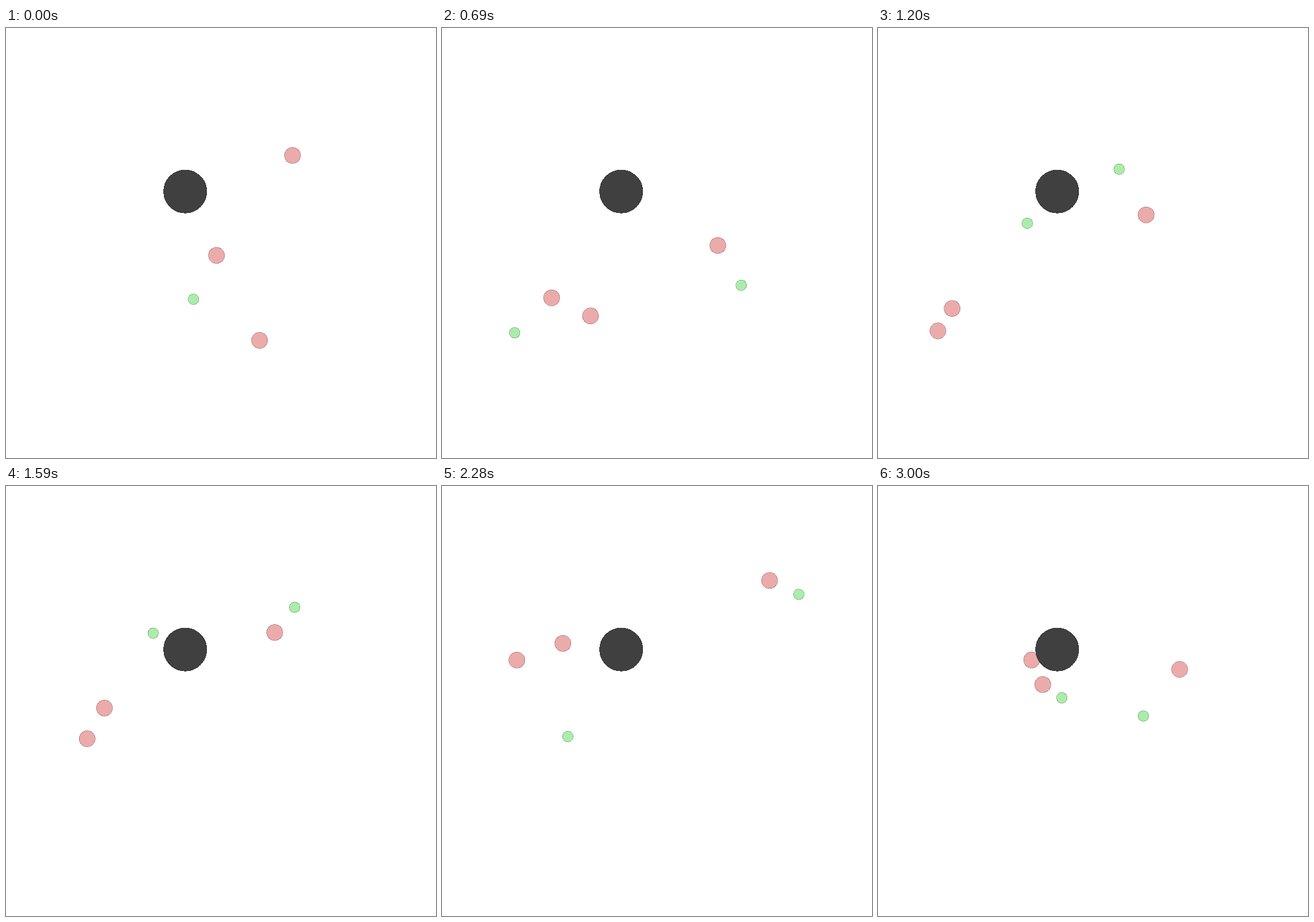
Write an HTML page that moves like this. It is 700x700 px and loops after 3030 ms.

```html
<!DOCTYPE html>
<html lang="en">
<head>
<meta charset="utf-8">
<title>Chase</title>
<style>
html, body { margin: 0; width: 100%; height: 100%; overflow: hidden; background: #fff; }
svg { display: block; shape-rendering: crispEdges; }
.chaser { fill: rgba(217,89,89,.5); stroke: rgba(108,45,45,.4); }
.runner { fill: rgba(89,217,89,.5); stroke: rgba(45,108,45,.4); }
.obstacle { fill: #404040; stroke: #383838; }
</style>
</head>
<body>
<svg id="stage" width="700" height="700"></svg>
<script>
const STEP = 30, STEPS = 101;
const SIZE = { chaser: 13.1, runner: 8.75, obstacle: 35 };
const times = [0, 23, 40, 53, 67, 86, 100];

function disc(kind, x, y) {
  const el = document.createElementNS("http://www.w3.org/2000/svg", "circle");
  el.setAttribute("class", kind);
  el.setAttribute("r", SIZE[kind]);
  el.setAttribute("cx", x);
  el.setAttribute("cy", y);
  return document.getElementById("stage").appendChild(el);
}

// Each agent passes one key point per time; bends push a leg (by index) off its curve
const agent = (kind, points, bends = {}) => ({ el: disc(kind, ...points[0]), points, bends });

const agents = [
  agent("chaser", [[466.5, 207.5], [449, 354], [436.5, 304.3], [437.5, 238.5], [496.5, 141.3], [550.5, 207.7], [491, 298.5]]),
  agent("chaser", [[342.7, 370.2], [178.5, 439.3], [97.5, 493], [132.2, 411.5], [124, 340.2], [142.6, 242.2], [250.2, 283.2]],
    { 3: [-29, 0] }),
  agent("chaser", [[412.8, 508.5], [241.8, 468.7], [120.7, 456.6], [160.3, 361.5], [214, 287.4], [182.4, 251], [268.2, 323.2]]),
  agent("runner", [[305.2, 441.6], [118.3, 496.2], [243, 317.9], [239.6, 239.6], [198.6, 257.6], [234, 342.3], [299.3, 344.8]],
    { 1: [-90, 20], 4: [0, 110] }),
  agent("runner", [[293, 268], [487.2, 418.8], [392.6, 229.8], [470, 197.5], [532.7, 122.2], [439.7, 310.5], [432, 374.5]],
    { 4: [85, -20] })
];
disc("obstacle", 291.7, 266.2);

const slope = (p, i, k) => (p[i + 1][k] - p[i][k]) / (times[i + 1] - times[i]);

function tangent(p, i, k) {
  if (i === 0) return slope(p, 0, k);
  if (i === p.length - 1) return slope(p, i - 1, k);
  const before = times[i] - times[i - 1], after = times[i + 1] - times[i];
  return (slope(p, i - 1, k) * after + slope(p, i, k) * before) / (before + after);
}

// Cubic Hermite curve through the key points, plus the bend of the current leg
function along({ points: p, bends }, step, k) {
  const i = Math.max(0, times.findIndex(t => t >= step) - 1);
  const h = times[i + 1] - times[i], u = (step - times[i]) / h, v = 1 - u;
  const curve = v * v * (1 + 2 * u) * p[i][k] + u * u * (1 + 2 * v) * p[i + 1][k]
    + h * u * v * (v * tangent(p, i, k) - u * tangent(p, i + 1, k));
  return curve + (bends[i] ? bends[i][k] * Math.sin(Math.PI * u) ** 2 : 0);
}

const start = performance.now();
function tick() {
  const step = Math.floor((performance.now() - start) / STEP) % STEPS;
  for (const a of agents) {
    a.el.setAttribute("cx", along(a, step, 0));
    a.el.setAttribute("cy", along(a, step, 1));
  }
  requestAnimationFrame(tick);
}
tick();
</script>
</body>
</html>
```
